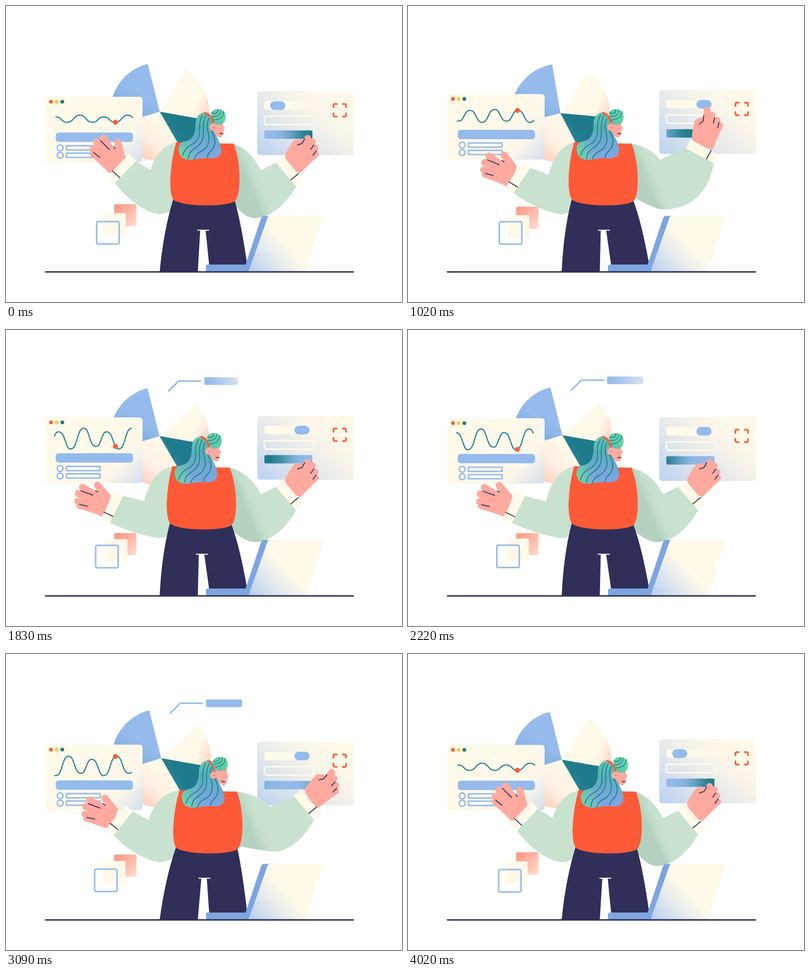
Recreate the animation shown at these times as an HTML page with a canvas. Size 800 px wide and 600 px high, loop 4050 ms.

```html
<!DOCTYPE html>
<html lang="en">
<head>
<meta charset="utf-8">
<title>Dashboard at work</title>
<style>
html, body { margin: 0; width: 100%; height: 100%; overflow: hidden; background: #fff; }
canvas { display: block; width: 800px; height: 600px; }
</style>
</head>
<body>
<canvas id="stage" width="800" height="600"></canvas>
<script>
const ctx = document.getElementById('stage').getContext('2d');
const LOOP = 4050, TAU = Math.PI * 2, RAD = Math.PI / 180;
const RED = '#ff5a38', NAVY = '#302f59', CREAM = '#fef9e9', BLUE = '#94bbeb', TEAL = '#1f7b8b',
      INK = '#1f7d8e', SKIN = '#ffa99f', SLEEVE = '#c8e2cf', SIDE = '#7da5e0';
let now = 0;

// Floating: one sine per loop, highest at the given time.
const float = (mean, amp, peak) => mean + amp * Math.cos(TAU * (now - peak) / LOOP);

function ease(from, to, t) {
  const u = Math.min(1, Math.max(0, (t - from) / (to - from)));
  return u * u * (3 - 2 * u);
}
// Gesture: rises from a to b, holds, falls from c to d; may run past the loop's end.
function swell(a, b, c, d) {
  const at = t => ease(a, b, t) * (1 - ease(c, d, t));
  return Math.max(at(now), at(now + LOOP));
}
const lerp = (a, b, u) => a + (b - a) * u;
const blend = (a, b, u) => `rgb(${a.map((n, i) => lerp(n, b[i], u))})`;

function gradient(x0, y0, x1, y1, ...stops) {
  const g = ctx.createLinearGradient(x0, y0, x1, y1);
  stops.forEach((c, i) => g.addColorStop(i / (stops.length - 1), c));
  return g;
}
function fill(style, path) {
  ctx.fillStyle = style;
  path ? ctx.fill(path) : ctx.fill();
}
function stroke(style, width, path) {
  ctx.strokeStyle = style;
  ctx.lineWidth = width;
  ctx.lineCap = ctx.lineJoin = 'round';
  path ? ctx.stroke(path) : ctx.stroke();
}
function box(x, y, w, h, r) {
  ctx.beginPath();
  ctx.roundRect(x, y, w, h, r);
}
function disc(x, y, r) {
  ctx.beginPath();
  ctx.arc(x, y, r, 0, TAU);
}
function line(style, width, ...p) {
  ctx.beginPath();
  for (let i = 0; i < p.length; i += 2) ctx.lineTo(p[i], p[i + 1]);
  stroke(style, width);
}
function group(x, y, angle, draw) {
  ctx.save();
  ctx.translate(x, y);
  ctx.rotate(angle * RAD);
  draw();
  ctx.restore();
}

function pie() {
  const shift = swell(4050, 4600, 4750, 5400), open = swell(3500, 4500, 4750, 5400);
  const top = -104 + 8.5 * shift, left = 163 + 5 * shift;
  const right = 10 - 9.5 * shift, low = 60 + 5 * shift;
  const slice = (a, b, style) => {
    ctx.beginPath();
    ctx.moveTo(0, 0);
    ctx.arc(0, 0, 100, a * RAD, b * RAD);
    fill(style);
  };
  group(float(310.8, 2.8, 3000), float(214.2, -3, 3000), 0, () => {
    slice(-42 - 28 * open, right, gradient(45, -35, 108, -10, CREAM, CREAM, '#ffd3c2'));
    slice(low, left, gradient(5, 20, -50, 85, CREAM, '#fff0e2', '#ffcdbb'));
    slice(left, top + 360, gradient(-20, -70, -60, 0, BLUE, BLUE, '#82aee0'));
    slice(right, low, gradient(10, 60, 70, 10, '#2b8796', TEAL, TEAL));
    callout();
  });
}

function callout() {
  const len = 73 * swell(1130, 1490, 3560, 3770);
  if (len > 1) {
    const a = 20 * Math.min(1, len / 28.3), b = Math.max(0, len - 28.3);
    line(BLUE, 3, 18.5, -91.5, 18.5 + a, -91.5 - a, 18.5 + a + b, -91.5 - a);
  }
  const w = 73 * swell(1480, 1900, 3500, 3720);
  if (w > 1) {
    box(90.5, -119, w, 15.5, 3);
    const tip = blend([222, 229, 236], [148, 187, 235], ease(2150, 2700, now));
    fill(gradient(100, 0, 165, 0, BLUE, tip));
  }
}

function chartWindow() {
  group(0, float(181, 4, 3600), 0, () => {
    box(79, 0, 197, 133, 6);
    fill(gradient(185, 55, 276, 140, CREAM, '#fbf6e9', '#cfdcee'));
    [RED, '#f2cf4f', TEAL].forEach((c, i) => { disc(91 + 11.4 * i, 10, 3.8); fill(c); });
    curve();
    box(100.5, 72.5, 156, 19, 6);
    fill(BLUE);
    for (const y of [103.5, 118.5]) {
      disc(109.5, y, 6);
      stroke(BLUE, 2.8);
      box(122, y - 4.3, 68, 8.6, 0);
      stroke(BLUE, 2.8);
    }
  });
}

function curve() {
  const tall = swell(650, 1400, 2900, 3950);
  const crest = 149 + 2.5 * tall - 97 * now / LOOP;
  const y = x => {
    const a = TAU * (x - crest) / 97;
    const round = 1.08 * Math.cos(2 * a) - 0.08 * Math.cos(6 * a);
    return 45.3 - 2 * tall - (6.2 + 11.5 * tall) * round -
      (1.8 - 5.5 * tall) * Math.cos(a) + 2.6 * tall * Math.sin(a);
  };
  const from = 101 - 3 * tall;
  ctx.beginPath();
  for (let x = from; x <= from + 155; x++) ctx.lineTo(x, y(x));
  stroke(INK, 2.2);
  disc(221, y(221), 5);
  fill(RED);
}

const slide = () => 49 * swell(540, 900, 3600, 3900);

function formWindow() {
  group(0, float(174, 4, 2850), 0, () => {
    box(507.5, 0, 195.5, 129.5, 6);
    fill(gradient(530, 130, 640, 0, '#c0d5f0', '#d6e1ee', '#e9ebea', '#f8f4e9', CREAM));
    box(522, 20.5, 130, 17, 4);
    fill(gradient(570, 0, 650, 0, CREAM, 'rgba(254,249,233,0)'));
    box(533.7 + slide(), 20.3, 30.6, 17.4, 8.7);
    fill(BLUE);
    box(522, 50.5, 99.5, 17, 4);
    stroke(CREAM, 3);
    button();
    scanner();
  });
}

// A band of teal passes along the button.
function button() {
  const g = ctx.createLinearGradient(522, 90, 619, 86), crest = 618 - 200 * now / LOOP;
  for (let u = 0; u <= 1; u += 0.125) {
    const band = Math.cos((522 + 97 * u - crest) * TAU / 400) ** 4;
    g.addColorStop(u, blend([146, 185, 233], [31, 123, 139], band));
  }
  box(522, 79.5, 97, 17, 3);
  fill(g);
}

function scanner() {
  for (let i = 0; i < 4; i++) group(674.2, 38.5, 90 * i, () => {
    ctx.beginPath();
    ctx.moveTo(6, -12.7);
    ctx.arcTo(12.7, -12.7, 12.7, 0, 2.5);
    ctx.lineTo(12.7, -6);
    stroke(RED, 3.3);
  });
}

function squares() {
  const y = float(406.8, 5, 2050), x = float(198.4, 2.5, 1440);
  box(218.5, y, 45, 45, 3);
  fill(gradient(222, y, 262, y + 45, '#ff9782', '#ffb9a8', '#ffdccd'));
  box(x, x + 223.5, 45, 45, 3);
  fill(CREAM);
  box(float(181.7, 3.2, 700), float(436.7, 0.7, 700), 45.4, 45.4, 3);
  stroke(BLUE, 3);
}

// The whole figure follows a few gestures.
function pose() {
  const glance = swell(1000, 1350, 1550, 1900);
  return {
    sway: -6.3 + 3.5 * glance + 15.6 * swell(2250, 3420, 3420, 4600),
    turn: glance + swell(2350, 2720, 3500, 3900),
    lift: swell(2600, 3420, 3420, 6100),
    wave: swell(3000, 4050, 4050, 5350),
    tap: swell(100, 560, 900, 1350),
    press: swell(2350, 3420, 3480, 3950)
  };
}

function pants(dx) {
  const c = dx * 0.42;
  ctx.beginPath();
  ctx.moveTo(337 + dx, 392);
  ctx.quadraticCurveTo(318 + dx * 0.6, 455, 310.5, 538);
  ctx.lineTo(387.5, 538);
  ctx.lineTo(392 + c, 455);
  ctx.lineTo(403 + c, 455);
  ctx.lineTo(410.5, 526);
  ctx.lineTo(487.5, 526);
  ctx.quadraticCurveTo(475 + dx * 0.4, 440, 461 + dx, 393);
  fill(NAVY);
  line(CREAM, 2, 387 + c, 454.5, 409.5 + c, 454.5);
}

const vestShape = new Path2D('M343 276Q400 278 459 279C471 310 473 350 469.5 374Q467 391 461 396C445 407 360 408 338 393Q331 385 331 355Q332 315 343 276Z');

function vest(dx) {
  ctx.save();
  ctx.transform(1, 0, -dx * 0.0018, 1, dx * 1.7, 0);
  fill(RED, vestShape);
  ctx.restore();
}

// A wrist is a place and an angle; at() gives stage points from cuff points.
function wristAt(x, y, angle) {
  const c = Math.cos(angle * RAD), s = Math.sin(angle * RAD);
  return { x, y, angle, at: (u, v) => [x + u * c - v * s, y + u * s + v * c] };
}
function cuff(w, seam) {
  group(w.x, w.y, w.angle, () => {
    box(-32, -10, 64, 20, 1.5);
    fill(CREAM);
    line(NAVY, 1.8, seam, -10.5, seam, 9.5);
  });
}
function finger(width, x, y, length, angle) {
  line(SKIN, width, x, y, x + length * Math.cos(angle * RAD), y + length * Math.sin(angle * RAD));
}

const leftPalm = new Path2D('M-45-47L-23-45L-7-35Q6-29 8-23L-19 7Q-27 11-31 3L-61-26Z');
const leftFolds = new Path2D('M-43-57L-25-39M-16-45L-13-40M-57-33L-44-23');

function leftArm({ sway, lift, wave }) {
  const w = wristAt(214 + 23 * lift, 360 - 35 * lift, -64 + 20 * lift);
  const cx = 279 + 15 * lift, cy = 347 - 17 * lift, bottom = w.at(-30, 8);
  ctx.beginPath();
  ctx.moveTo(346 + sway, 276);
  ctx.quadraticCurveTo(cx + 16, 282, cx, cy);
  ctx.lineTo(...w.at(30, 7));
  ctx.lineTo(...bottom);
  ctx.quadraticCurveTo((bottom[0] + 308) / 2 - 2, 413, 308, 422);
  ctx.quadraticCurveTo(326, 423, 344 + sway, 406);
  ctx.lineTo(370 + sway, 340);
  fill(SLEEVE);
  group(w.x, w.y, 25 * wave - 25, () => {
    finger(14.5, -37, -62, 36, 57);
    finger(14.5, -50, -54, 36, 47);
    finger(13.5, -58, -41, 34, 41);
    finger(12, -59, -31, 34, 40);
    finger(14.5, -8, -53, 27, 75);
    fill(SKIN, leftPalm);
    stroke(NAVY, 1.8, leftFolds);
  });
  cuff(w, -16);
}

const rightPalm = new Path2D('M-11-30Q-6-45 7-63L22-66L46-50L54-32L22 3Q5 0-11-30Z');
const rightFolds = new Path2D('M28-67L23-57L14-54M47-55L41-46M52-43L46-34');

function rightArm({ sway, tap, press }) {
  const raise = press * press, point = tap + raise;
  const w = wristAt(573 + (slide() - 23) * tap + 47 * press, 335 - 49 * point, 50 - 27 * tap);
  const cx = 515 - 7 * tap + 25 * press, cy = 333 - 26 * tap - 38 * raise;
  const lx = 504 + 17 * tap + 53 * press, ly = 430 - 21 * tap - 49 * raise;
  const bottom = w.at(31, 7);
  ctx.beginPath();
  ctx.moveTo(455 + sway, 278);
  ctx.quadraticCurveTo(cx - 22, 281 + (cy - 295) * 0.2, cx, cy);
  ctx.lineTo(...w.at(-30, 6));
  ctx.lineTo(...bottom);
  ctx.quadraticCurveTo(bottom[0] - 36 + 24 * tap, ly - 4, lx, ly);
  ctx.quadraticCurveTo(lx - 18, ly, 468 + sway, 411 - 25 * tap - 35 * raise);
  ctx.lineTo(440 + sway, 375);
  ctx.closePath();
  fill(SLEEVE);
  fill(gradient(468 + sway, 310, 496 + sway, 298, 'rgba(115,155,138,.24)', 'rgba(200,226,207,0)'));

  group(w.x, w.y, 2 - 27 * tap + 10 * press, () => {
    finger(14, 12, -58, 23, 119);
    finger(13.5, 34 + 5 * point, -68 - 8 * point, 31, 116);
    finger(13, 44, -62, 31, 117);
    finger(13, 50, -49, 28, 125);
    finger(12, 52, -37, 30, 136);
    fill(SKIN, rightPalm);
    stroke(NAVY, 1.8, rightFolds);
  });
  cuff(w, 15);
}

const hair = new Path2D('M402 215C388 217 382 226 382 242C382 262 374 273 358 275C349 278 346 288 349 297C352 309 362 313 378 311C392 309 402 307 414 309C426 309 435 303 434 290C432 276 426 268 421 256L420 236Q414 218 402 215Z');
const strands = new Path2D('M396 222C382 245 401 260 378 279Q360 287 356 303M403 222C391 246 406 262 390 281C376 294 370 292 368 309M409 228C399 248 415 263 407 281C400 297 384 293 380 310M414 252C426 273 421 286 413 294Q406 300 406 307');
const face = new Path2D('M414 236L420 229L438 229V243Q444 247 438.5 252Q439 266 431 266.5Q425 267 417 251Z');
const mouth = new Path2D('M431.5 258Q434 260 437.5 258');
const fringe = new Path2D('M0-8Q5-17 15-16Q30-15 30-1Q30 16 15 16Q6 15 4 9Z');
const locks = new Path2D('M2-8Q15-5 14-15M3-1Q20 0 20-14M5 6Q25 5 26-11');
const band = new Path2D('M-2 215Q13 215 19 237L14.5 239Q12 222 0 219Z');

function head({ sway, turn }) {
  group(1.17 * sway, 0, 0, () => {
    fill(gradient(392, 215, 398, 311, '#66c9ad', '#54b0b8', '#6fa8d2', '#7fa5e2'), hair);
    fill(gradient(349, 303, 384, 288, '#6ad99f', 'rgba(106,217,159,0)'), hair);
    stroke(INK, 1.8, strands);
    group(turn, 0, 0, () => fill(SKIN, face));
    disc(416.5 - 5 * turn, 246, 7);
    fill(SKIN);
    disc(418 - 5 * turn, 246.5, 0.8);
    fill(NAVY);
    group(434 - 3 * turn, 258, 15 * turn, () => {
      ctx.translate(-434, -258);
      stroke(NAVY, 1.7, mouth);
    });
    group(413 - 2 * turn, 225, -8 * turn, () => {
      ctx.scale(1, 1 - 0.12 * turn);
      fill(gradient(0, 11, 29, -11, '#57c0ad', '#69d7a3'), fringe);
      stroke(INK, 1.5, locks);
    });
    group(401, 0, 0, () => {
      ctx.scale(1 - 0.3 * turn, 1);
      fill(RED, band);
    });
  });
}

const lid = new Path2D('M521 425.5H536L495 538H484V524L515 431Q517 425.5 521 425.5Z');
const screen = new Path2D('M533 425.5H637Q642 425.5 640.5 430L606 538H490L528 430Q529 425.5 533 425.5Z');

function laptop() {
  box(404, 524, 90, 14, [4, 0, 0, 2]);
  fill(SIDE);
  fill(SIDE, lid);
  fill(gradient(492, 540, 560, 478, '#b4cdf0', '#dde6ee', CREAM), screen);
}

function frame(ms) {
  now = Math.floor(ms % LOOP / 30) * 30;
  ctx.fillStyle = '#fff';
  ctx.fillRect(0, 0, 800, 600);
  const p = pose();
  pie();
  chartWindow();
  formWindow();
  squares();
  leftArm(p);
  rightArm(p);
  pants(p.sway);
  vest(p.sway);
  head(p);
  laptop();
  line(NAVY, 2.8, 80, 539, 701.5, 539);
}

const start = performance.now();
function tick() {
  frame(performance.now() - start);
  requestAnimationFrame(tick);
}
tick();
</script>
</body>
</html>
```
